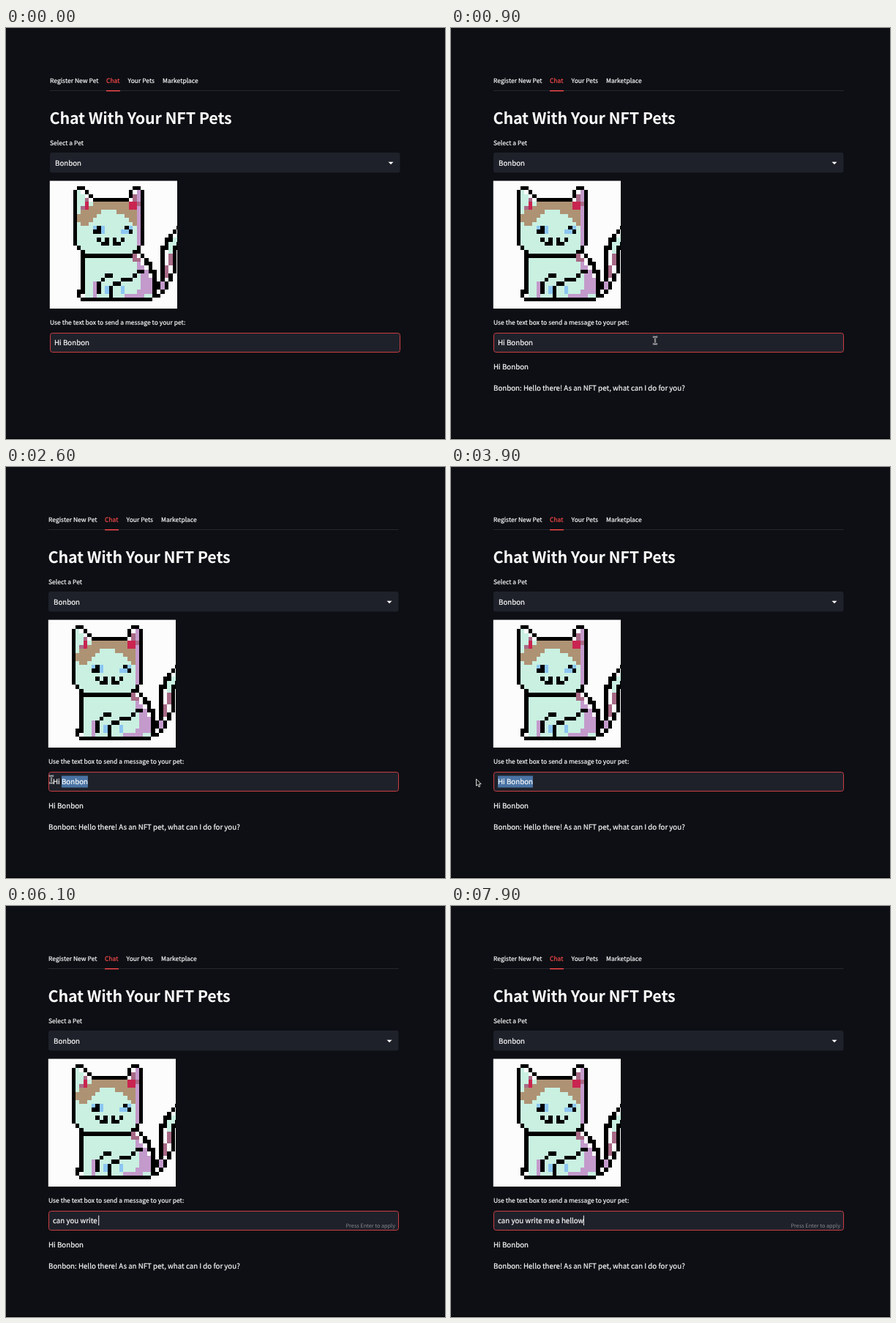
Recreate the animation shown at these times as an HTML page. Size 600x561 px, loop 8000 ms.

```html
<!DOCTYPE html>
<html lang="en">
<head>
<meta charset="utf-8">
<title>Chat With Your NFT Pets</title>
<style>
  html, body { margin: 0; width: 100%; height: 100%; overflow: hidden; background: #0d0f14; }
  svg { display: block; width: 600px; height: 561px; }
  text {
    font-family: "Noto Sans CJK SC", "Noto Sans CJK JP", "Noto Sans CJK", "Open Sans", sans-serif;
    font-size: 9.72px; color: #fafafa; white-space: pre; text-rendering: geometricPrecision;
    fill: currentColor; stroke: currentColor; stroke-width: .2px;
  }
  .small { font-size: 8.53px; }
  .title { font-size: 21.5px; font-weight: 700; letter-spacing: -.18px; stroke: none; }
  .hint { font-size: 7.3px; color: #85868d; text-anchor: end; stroke: none; }
  .active { color: #ff4b4b; }
  #cat { shape-rendering: crispEdges; }
</style>
</head>
<body>
<svg viewBox="0 0 600 561">
  <defs>
    <clipPath id="photo"><rect x="58" y="209" width="174" height="174"/></clipPath>
    <path id="beam" d="M-2.2-4.8Q0-4.8 0-3.4V3.4Q0 4.8-2.2 4.8M2.2-4.8Q0-4.8 0-3.4M0 3.4Q0 4.8 2.2 4.8" fill="none"/>
  </defs>
  <rect width="600" height="561" fill="#0d0f14"/>
  <rect y="560" width="600" height="1" fill="#000"/>

  <g id="page">
    <text class="small" x="58" y="75">Register New Pet</text>
    <text class="small active" x="135" y="75">Chat</text>
    <text class="small" x="164.5" y="75">Your Pets</text>
    <text class="small" x="212" y="75">Marketplace</text>
    <rect x="58" y="85" width="478.5" height="1" fill="#262831"/>
    <rect x="135" y="85" width="19" height="1.4" fill="#ff4b4b"/>

    <text class="title" x="57.5" y="130.9">Chat With Your NFT Pets</text>
    <text class="small" x="58" y="160">Select a Pet</text>
    <rect x="58" y="170" width="478.5" height="27.5" rx="3" fill="#1f212a"/>
    <text x="65" y="187.7">Bonbon</text>
    <path d="M520.5 182.7h7l-3.5 3.6z" fill="#fafafa"/>

    <rect x="57.8" y="208.6" width="174.2" height="174.4" fill="#fcfcfc"/>
    <g clip-path="url(#photo)"><g id="cat" transform="translate(56.9 210.2) scale(5.44)"></g></g>

    <text class="small" x="58" y="405.4">Use the text box to send a message to your pet:</text>
    <rect x="58.5" y="416.5" width="478" height="26" rx="3" fill="#1f212a" stroke="#cb3e44"/>
    <rect id="mark" y="421.5" height="16" fill="#4a74a5"/>
    <text id="field" x="64" y="433"></text>
    <rect id="caret" y="422.5" width="1" height="13.5" fill="#fafafa"/>
    <text id="hint" class="hint" x="532" y="439.4">Press Enter to apply</text>

    <g id="reply">
      <text x="58" y="466.4">Hi Bonbon</text>
      <text x="58" y="494.6">Bonbon: Hello there! As an NFT pet, what can I do for you?</text>
    </g>
  </g>

  <g id="pointer">
    <g id="ibeam" stroke-linecap="round">
      <use href="#beam" stroke="#d4d4d6" stroke-width="2.2"/>
      <use href="#beam" stroke="#15161b" stroke-width=".8"/>
    </g>
    <path id="arrow" d="M-2.5-5.2V4.2L-.4 2.3 1 5.7 2.7 5 1.3 1.7H4.2Z" fill="#0a0a0a" stroke="#f2f2f2" stroke-width=".9"/>
  </g>
</svg>

<script>
const LOOP = 8000;
const REPLY = 400, ENTER = 700, DRAG = 2200, LEAVE = 2700, LAG = 100;
const HELLO = 'Hi Bonbon';
const DRAFT = 'can you write me a hellow';
const $ = id => document.getElementById(id);

const pen = document.createElement('canvas').getContext('2d');
pen.lineWidth = .96;
pen.lineCap = 'square';
pen.lineJoin = 'round';

// Turns an outline into square pixels; closed shapes are also filled
function pixels(color, outline, filled = false) {
  const shape = new Path2D(outline);
  let d = '';
  for (let y = 0; y < 32; y++) {
    for (let x = 0; x <= 32; x++) {
      const hit = pen.isPointInStroke(shape, x, y) || (filled && pen.isPointInPath(shape, x, y));
      if (hit) d += `M${x} ${y}h1v1h-1z`;
    }
  }
  const path = document.createElementNS('http://www.w3.org/2000/svg', 'path');
  path.setAttribute('d', d);
  path.setAttribute('fill', color);
  $('cat').append(path);
}

function drawCat() {
  const mint = '#c9f0e1', tan = '#ae9274', lilac = '#c39acb', mauve = '#a86a86', blue = '#8cc6f2';
  pixels(mint, 'M7 2L10 5H20L22 2V17H9L7 15Z', true);
  pixels(mint, 'M9 19H21L25 24V28H9Z', true);
  pixels(mint, 'M32 13L30 15V17H31Z', true);
  pixels(tan, 'M8 7L11 5H19L21 7V10L18 7 16 6H13L11 8 9 10 7 9Z', true);
  pixels(lilac, 'M22 2V16M11 25V28M19 28H22M28 24V26');
  pixels(lilac, 'M22 20L25 24V27L22 28 23 25Z', true);
  pixels(mauve, 'M9 4V6H8M21 3V5H22M20 18L22 19M30 18L29 23');
  pixels('#c92550', 'M9 5V6M20 5H21V6H20Z');
  pixels(blue, 'M11 11H13V12M18 12H20V11M14 26V27M18 26V27');
  // face
  pixels('#000', 'M11 12H12V11M19 11L20 12M12 14L13 15H14V14M16 14V15H17L18 14');
  // head, body, legs, tail
  pixels('#000', 'M6 15V2L7 1H8L11 4H19L21 1H22L23 2V15L22 16 20 18H9Z');
  pixels('#000', 'M8 18V26L7 28 8 29H25M22 17L24 19 26 23V28');
  pixels('#000', 'M12 27V25L14 23H15M15 28V26L18 24H20L22 22H23');
  pixels('#000', 'M32 11L30 13 28 17V23L27 26M32 15L31 17V21L29 26 27 28');
}

// Straight runs between [time, value] points
function follow(points, t) {
  const i = points.findIndex(p => p[0] > t);
  if (i < 0) return points[points.length - 1][1];
  if (i === 0) return points[0][1];
  const [[t0, v0], [t1, v1]] = [points[i - 1], points[i]];
  return v0 + (v1 - v0) * (t - t0) / (t1 - t0);
}

const pointerX = t => follow([[ENTER, 268], [900, 279], [1500, 286], [DRAG, 114], [2600, 62], [LEAVE, 37]], t);
const lettersTyped = t => Math.floor(follow([[4100, 0], [4800, 5], [6000, 14], [7900, DRAFT.length]], t));

const show = (id, on) => $(id).setAttribute('visibility', on ? 'visible' : 'hidden');

// The selection runs from the letter under the dragged pointer to the end
function renderSelection(t) {
  const field = $('field');
  const x = pointerX(t - LAG);
  let from = 0;
  while (from < HELLO.length && field.getStartPositionOfChar(from).x < x) from++;
  const selected = t > DRAG && from < HELLO.length;
  show('mark', selected);
  if (!selected) return;
  const left = field.getStartPositionOfChar(from).x;
  $('mark').setAttribute('x', left);
  $('mark').setAttribute('width', 64 + field.getComputedTextLength() - left);
}

function render(t) {
  const typed = lettersTyped(t);
  const typing = typed > 0;
  const field = $('field');
  const value = typing ? DRAFT.slice(0, typed) : HELLO;
  if (field.textContent !== value) field.textContent = value;

  $('page').setAttribute('transform', `translate(${t < REPLY ? 2 : 0} 0)`);
  show('reply', t >= REPLY);
  show('hint', typing);
  show('caret', typing);
  $('caret').setAttribute('x', 63.5 + field.getComputedTextLength());
  if (typing) show('mark', false);
  else renderSelection(t);

  const visible = t >= ENTER && !typing;
  const outside = t >= LEAVE;
  $('pointer').setAttribute('transform', `translate(${pointerX(t)} ${outside ? 431 : 426.5})`);
  show('ibeam', visible && !outside);
  show('arrow', visible && outside);
}

drawCat();
const start = performance.now();
function tick() {
  const t = (performance.now() - start) % LOOP;
  render(Math.floor(t / 100) * 100);
  requestAnimationFrame(tick);
}
tick();
</script>
</body>
</html>
```
